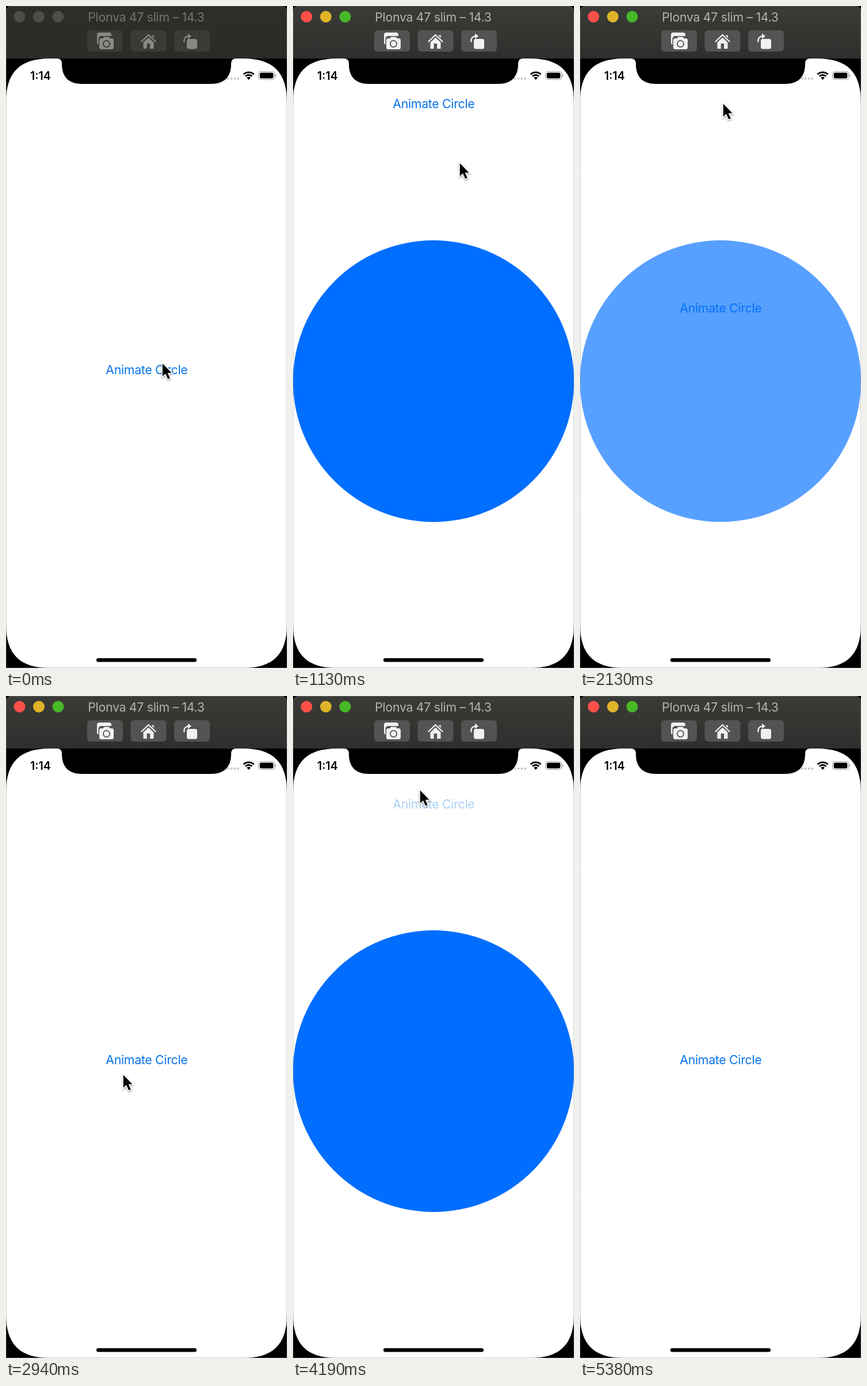
An HTML page with a canvas for the animation above (5.45 s loop, 488 by 1147 pixels).

```html
<!DOCTYPE html>
<html lang="en">
<head>
<meta charset="utf-8">
<title>Animate Circle</title>
<style>
  html, body { margin: 0; width: 488px; height: 1147px; overflow: hidden; background: #000; }
  canvas { display: block; width: 488px; height: 1147px; }
</style>
</head>
<body>
<canvas id="stage"></canvas>
<script>
const W = 488, H = 1147, LOOP = 5450, STEP = 62.5;
const SANS = 'Inter, "Open Sans", sans-serif';
const canvas = document.getElementById('stage');
const ctx = canvas.getContext('2d');
const dpr = window.devicePixelRatio || 1;
canvas.width = W * dpr;
canvas.height = H * dpr;
ctx.scale(dpr, dpr);

const ACTIVATE = 187, DURATION = 350;
// Button releases: each one toggles the circle
const TAPS = [500, 1884, 3162, 4145];

// Pointer tip: time, x, y
const POINTER = [
  [0, 271, 618], [650, 271, 618], [1125, 289, 271], [1650, 248, 168],
  [2187, 248, 168], [2650, 222, 705], [2937, 203, 655], [3100, 195, 642],
  [3500, 195, 642], [3940, 220, 162], [4400, 220, 162], [4800, 219, 222],
  [5125, 138, 248], [5360, -24, -36], [LOOP, -24, -36]
];

const clamp = v => Math.max(0, Math.min(1, v));
const smooth = v => v * v * (3 - 2 * v);
const mix = (a, b, k) => a + (b - a) * k;

function layout(t) {
  const s = { move: 0, alpha: 0, text: 1 };
  TAPS.forEach((tap, i) => {
    if (t > tap - 125 && t < tap) s.text = 0.2;
    if (t < tap) return;
    const k = clamp((t - tap) / DURATION);
    const opening = i % 2 === 0;
    s.move = opening ? smooth(k) : 1 - smooth(k);
    s.alpha = opening ? 1 - (1 - k) ** 1.75 : 1 - k ** 2.85;
    s.text = mix(0.28, 1, smooth(clamp((t - tap) / 250)));
  });
  return s;
}

function pointerAt(t) {
  const i = Math.max(1, POINTER.findIndex(p => p[0] > t));
  const [t0, x0, y0] = POINTER[i - 1], [t1, x1, y1] = POINTER[i];
  const k = smooth(clamp((t - t0) / (t1 - t0)));
  return [mix(x0, x1, k), mix(y0, y1, k)];
}

function box(x, y, w, h, r, fill) {
  ctx.beginPath();
  ctx.roundRect(x, y, w, h, r);
  ctx.fillStyle = fill;
  ctx.fill();
}

function disc(x, y, r, fill) {
  ctx.beginPath();
  ctx.arc(x, y, r, 0, Math.PI * 2);
  ctx.fillStyle = fill;
  ctx.fill();
}

function line(path, color, width) {
  ctx.strokeStyle = color;
  ctx.lineWidth = width;
  ctx.stroke(new Path2D(path));
}

function label(text, x, y, font, color, align, spacing) {
  ctx.font = font + ' ' + SANS;
  ctx.textAlign = align;
  ctx.letterSpacing = spacing + 'px';
  ctx.fillStyle = color;
  ctx.fillText(text, x, y);
}

function toolbar(active) {
  const bar = ctx.createLinearGradient(0, 0, 0, 91);
  bar.addColorStop(0, active ? '#3b3b38' : '#2d2e29');
  bar.addColorStop(1, active ? '#2e2e2c' : '#2b2c27');
  box(0, 0, W, 91, [9, 9, 0, 0], bar);
  const lights = active ? ['#fe5049', '#e0b428', '#46b827'] : ['#4d4d4a', '#4d4d4a', '#4d4d4a'];
  lights.forEach((c, i) => disc(23.5 + i * 33.5, 18.5, 10, c));
  label('Plonva 47 slim – 14.3', 243.5, 27, '400 21.3px', active ? '#b3b3b0' : '#73736f', 'center', -0.3);

  const key = active ? '#535351' : '#3a3b36';
  const ink = active ? '#f0f0ee' : '#888885';
  [141, 216.5, 292].forEach(x => box(x, 42, 62, 37, 6, key));

  // Camera
  box(158, 46, 25, 21, 4, ink);
  box(160.5, 52, 28, 25, 5, key);
  box(162, 56, 25, 19, 3.5, ink);
  box(169, 53.5, 11, 5, 2, ink);
  disc(174.5, 65.5, 6.5, key);
  disc(174.5, 65.5, 4.7, ink);

  // Home
  ctx.lineCap = ctx.lineJoin = 'round';
  ctx.fillStyle = ink;
  ctx.fill(new Path2D('M238.5 63L247.5 54.5L256.5 63V74H238.5Z'));
  box(253.5, 50.5, 3.2, 8, 0.5, ink);
  line('M235.5 61.5L247.5 50L259.5 61.5', key, 5);
  line('M235.5 61.5L247.5 50L259.5 61.5', ink, 2.4);
  box(244.7, 65, 5.4, 9, 0.5, key);

  // Rotate
  box(314, 57, 18, 17.5, 3.5, ink);
  line('M309.3 62C308.7 56 312 52.5 317 52.3', ink, 2.2);
  ctx.fillStyle = ink;
  ctx.fill(new Path2D('M316 47.5L322 52.3L316 57Z'));
}

function screen() {
  ctx.fillStyle = '#fff';
  ctx.fill(new Path2D(
    'M0 167C0 115 24 91 76 91H88C94 91 97 94 97 100C97 123 109 135 132 135' +
    'H356C379 135 391 123 391 100C391 94 394 91 400 91H412C464 91 488 115 488 167' +
    'V1071C488 1123 464 1147 412 1147H76C24 1147 0 1123 0 1071Z'));
}

function statusBar() {
  label('1:14', 42, 127.7, '600 19.6px', '#000', 'left', 0);
  for (let i = 0; i < 4; i++) disc(385.5 + i * 5.9, 125.7, 2, '#c6c6c6');
  ctx.lineCap = 'butt';
  ctx.strokeStyle = '#000';
  ctx.lineWidth = 2.8;
  [12.7, 8].forEach(r => {
    ctx.beginPath();
    ctx.arc(421.5, 127.5, r, -Math.PI * 0.75, -Math.PI * 0.25);
    ctx.stroke();
  });
  ctx.beginPath();
  ctx.moveTo(421.5, 128);
  ctx.arc(421.5, 127.5, 4.7, -Math.PI * 0.75, -Math.PI * 0.25);
  ctx.fillStyle = '#000';
  ctx.fill();

  ctx.beginPath();
  ctx.roundRect(438.5, 113.5, 28, 14, 4.2);
  ctx.strokeStyle = '#a3a3a3';
  ctx.lineWidth = 1.2;
  ctx.stroke();
  box(440.7, 115.6, 23.6, 9.9, 2.4, '#000');
  box(467.6, 118, 1.7, 5, [0, 1.7, 1.7, 0], '#a3a3a3');
}

const ARROW = new Path2D('M0.8 1.5V23.8L6 19L10.2 28.3L13.8 26.7L9.7 17.7H16.6Z');

function pointer(x, y) {
  ctx.save();
  ctx.translate(x, y);
  ctx.lineJoin = 'miter';
  ctx.shadowColor = 'rgba(0,0,0,.4)';
  ctx.shadowBlur = 3 * dpr;
  ctx.shadowOffsetY = 1.5 * dpr;
  ctx.strokeStyle = '#fff';
  ctx.lineWidth = 3;
  ctx.stroke(ARROW);
  ctx.shadowColor = 'transparent';
  ctx.fillStyle = '#000';
  ctx.fill(ARROW);
  ctx.restore();
}

function draw(t) {
  const s = layout(t);
  ctx.fillStyle = '#000';
  ctx.fillRect(0, 0, W, H);
  toolbar(t >= ACTIVATE);
  screen();
  statusBar();

  ctx.globalAlpha = s.text;
  label('Animate Circle', 244.3, mix(637.6, 176.6, s.move), '400 21.4px', '#0874ea', 'center', -0.35);
  ctx.globalAlpha = s.alpha;
  disc(244, 650, 244, '#006eff');
  ctx.globalAlpha = 1;

  box(157, 1130, 174, 6.5, 3.2, '#000');
  ctx.beginPath();
  ctx.roundRect(0.5, 0.5, W - 1, H - 1, [9, 9, 0, 0]);
  ctx.strokeStyle = 'rgba(140,140,140,.4)';
  ctx.lineWidth = 1;
  ctx.stroke();
  pointer(...pointerAt(t));
}

function tick(now) {
  const t = now % LOOP;
  draw(Math.min(86, Math.floor((t + 5) / STEP)) * STEP);
  requestAnimationFrame(tick);
}
draw(0);
requestAnimationFrame(tick);
</script>
</body>
</html>
```
